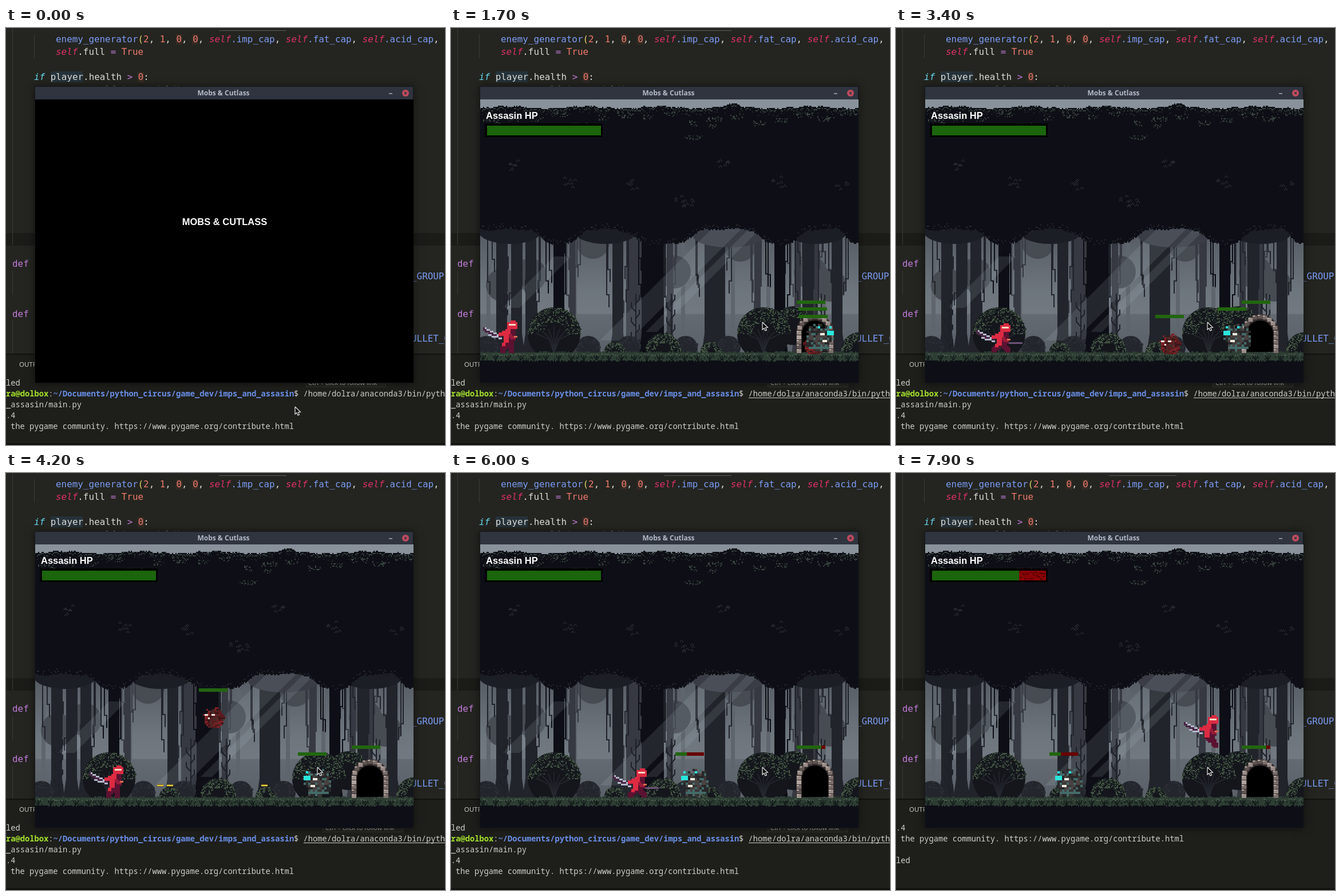
Write an HTML page with a canvas that moves like this. It is 767 by 730 pixels and loops after 8000 ms.

```html
<!DOCTYPE html>
<html lang="en">
<head>
<meta charset="utf-8">
<title>Mobs &amp; Cutlass</title>
<style>
html, body { margin: 0; width: 100%; height: 100%; overflow: hidden; background: #242520; }
canvas { display: block; }
</style>
</head>
<body>
<canvas id="stage" width="767" height="730"></canvas>
<script>
const W = 767, H = 730, LOOP = 8000, STEP = 100, TILE = 366;
const CODE = '15.9px "DejaVu Sans Mono", monospace';
const TERM = '13.75px "Noto Sans Mono", monospace';
const GAME = 'bold 16.5px "Liberation Sans", sans-serif';
const INK = '#0e0f16';
const ctx = document.getElementById('stage').getContext('2d');

function rect(g, color, x, y, w, h) {
  g.fillStyle = color;
  g.fillRect(x, y, w, h);
}
function disc(g, color, x, y, rx, ry = rx) {
  g.fillStyle = color;
  g.beginPath();
  g.ellipse(x, y, rx, ry, 0, 0, 7);
  g.fill();
}
function path(g, points) {
  g.beginPath();
  points.forEach(([x, y]) => g.lineTo(x, y));
}
function poly(g, color, points) {
  g.fillStyle = color;
  path(g, points);
  g.fill();
}
function line(g, color, width, points) {
  g.strokeStyle = color;
  g.lineWidth = width;
  path(g, points);
  g.stroke();
}
function text(g, str, x, y, font, color, align = 'left') {
  g.font = font;
  g.fillStyle = color;
  g.textAlign = align;
  g.fillText(str, x, y);
}
function layer(draw) {
  const c = document.createElement('canvas');
  c.width = W;
  c.height = H;
  draw(c.getContext('2d'));
  return c;
}
function random(seed) {
  return () => (seed = (seed * 16807) % 2147483647) / 2147483647;
}
const pick = (list, rnd) => list[Math.floor(rnd() * list.length)];

// Piecewise linear value through [time, value] points
function track(points, t) {
  const i = points.findIndex(([time]) => time >= t);
  if (i < 0) return points[points.length - 1][1];
  if (i === 0) return points[0][1];
  const [a, va] = points[i - 1], [b, vb] = points[i];
  return va + (vb - va) * (t - a) / (b - a);
}
// Height above ground for ballistic jumps given as [time of peak, height]
function jump(list, t) {
  return Math.max(0, ...list.map(([peak, h]) => h - 2500 * ((t - peak) / 1000) ** 2));
}

function drawEditor(g) {
  const blue = '#7b9cf5', num = '#f07a6c', pink = '#e0306a', white = '#dcdcd6', violet = '#c37bdc';
  const self = ['self', pink, true], comma = [', ', white];
  function code(row, x, ...parts) {
    for (const [str, color, italic] of parts) {
      text(g, str, x, Math.round(25.4 + row * 21.83), (italic ? 'italic ' : '') + CODE, color);
      x += g.measureText(str).width;
    }
  }
  rect(g, '#242520', 0, 0, W, H);
  rect(g, '#1b1c18', 0, 359, W, 22);
  rect(g, '#5c5d58', 372, 4, 118, 1);
  for (const [x, y, h] of [[11, 0, 380], [49, 10, 42], [11, 425, 42], [11, 512, 58]])
    rect(g, '#3a3b36', x, y, 1, h);
  for (const [x, y] of [[297, 11], [325, 11], [230, 77]]) rect(g, '#342b24', x, y, 11, 18);
  rect(g, '#25323a', 78, 76, 56, 19);
  code(0, 87, ['enemy_generator', blue], ['(', '#e6d36a'], ['2', num], comma, ['1', num], comma,
    ['0', num], comma, ['0', num], comma, self, ['.imp_cap', blue], comma,
    self, ['.fat_cap', blue], comma, self, ['.acid_cap', blue], comma, self);
  code(1, 87, self, ['.full ', white], ['= ', violet], ['True', num]);
  code(3, 49, ['if', '#66d9ef', true], [' player.health ', white], ['> ', violet], ['0', num], [':', white]);
  code(4, 154, ['self.imp.model()', '#7a7b76']);
  code(18, 11, ['def', violet]);
  code(19, 708, ['_GROUP', blue]);
  code(22, 11, ['def', violet]);
  code(24, 708, ['ULLET_G', blue]);
  rect(g, '#1e1f1b', 0, 571, W, 159);
  rect(g, '#11120f', 0, 570, W, 2);
  rect(g, '#11120f', 0, 727, W, 3);
  text(g, 'OUTPUT', 23, 593, '11.5px "Open Sans", sans-serif', '#d8d8d2');
}

function drawForest(g) {
  const rnd = random(77);
  const snap = v => Math.round(v / 2) * 2;
  const speck = (color, x, y) => rect(g, color, snap(x), snap(y), 2, 2);
  const dip = (x, c, w) => Math.exp(-(((x - c) / w) ** 4));
  const rim = x => 351 + 1.5 * Math.sin(x / 9) +
    26 * Math.max(dip(x, 188, 38), dip(x, 368, 55), dip(x, 573, 38), dip(x, 718, 30));

  const sky = g.createLinearGradient(0, 350, 0, 570);
  [[0, '#555a62'], [0.5, '#6d757d'], [0.68, '#727981'], [0.69, '#646a72'], [1, '#5a6068']]
    .forEach(([at, color]) => sky.addColorStop(at, color));
  rect(g, sky, 50, 345, 662, 230);

  for (const x of [62, 213, 402, 489, 551, 648]) rect(g, '#5f656d', x, 370, 7, 200);
  for (const [x, y] of [[90, 450], [138, 432], [248, 375], [390, 427], [505, 380], [628, 428], [662, 450]])
    disc(g, '#474b52', x, y, 29);

  function trunk(color, x, w) {
    rect(g, color, x, 352, w, 218);
    poly(g, color, [[x - 5, 570], [x, 535], [x + w, 535], [x + w + 5, 570]]);
    // Hooked vines beside the trunk
    for (let i = 0; i < 4; i++) {
      const side = i % 2 ? x + w + rnd() * 12 : x - 4 - rnd() * 12;
      const end = 390 + rnd() * 90, inward = i % 2 ? -4 : 4;
      line(g, color, 2, [[snap(side), 355], [snap(side), end], [snap(side) + inward, end], [snap(side) + inward, end + 22]]);
    }
  }
  for (const x of [207, 306, 377, 530, 600, 630]) trunk('#363941', x, x === 306 ? 27 : 11);
  for (const x of [79, 105, 130, 282, 443, 460, 614, 665]) trunk('#22242b', x, 19);
  disc(g, '#3a3d45', 485, 364, 62, 20);
  for (const x of [103, 270, 638]) disc(g, '#1c1e25', x, 357, 54, 21);
  for (const [x, w] of [[179, 19], [333, 39], [565, 19]]) trunk(INK, x, w);

  // Slanted shafts of light
  for (const [x, y, w, drop] of [[455, 352, 52, 195], [520, 352, 20, 180], [180, 400, 30, 90]])
    poly(g, 'rgba(190,200,215,.12)', [[x, y], [x + w, y], [x + w - drop, y + drop], [x - drop, y + drop]]);

  // Bare saplings
  for (const x of [92, 322, 384, 646]) {
    rect(g, '#1f2128', x, 465, 2, 105);
    for (let y = 475; y < 555; y += 13) {
      const d = y % 2 ? 7 : -7;
      line(g, '#1f2128', 2, [[x, y + 8], [x + d, y], [x + d, y - 8]]);
    }
  }

  // Canopy between a bumpy roof and the drooping rim
  rect(g, '#89929b', 50, 125, 662, 20);
  for (let x = 50; x < 712; x += 2) {
    const top = snap(138 + 2 * Math.sin(x / 21) + Math.sin(x / 5) + rnd() * 2 - 4 * dip(x, 490, 14));
    rect(g, INK, x, top, 2, snap(rim(x) + rnd() * 3) - top);
    if (rnd() < 0.65) speck('#34413d', x, top + rnd() * 5);
    if (rnd() < 0.4) speck('#1f2728', x, top + 4 + rnd() * 8);
    if (rnd() < 0.4) speck('#25282e', x, rim(x) - rnd() * 8);
  }
  function leaves(x, y, rx) {
    for (let i = 0; i < rx * 1.5; i++)
      speck(pick(['#3a4540', '#252d2d'], rnd), x + (rnd() - 0.5) * 2 * rx, y + (rnd() - 0.5) * 8);
  }
  for (let x = 70; x < 700; x += 39) leaves(x, 148 + rnd() * 20, 9 + rnd() * 8);
  leaves(423, 191, 16);
  leaves(456, 171, 8);
  function sprigs(x, y, n) {
    for (let i = 0; i < n; i++) {
      const px = x + (rnd() - 0.5) * n * 3, py = y + (rnd() - 0.5) * 18;
      for (const d of [-2, 0, 2]) speck('#26282d', px + d, py + Math.abs(d));
    }
  }
  for (const [x, y] of [[110, 237], [205, 267], [317, 271]]) {
    sprigs(x, y, 7);
    sprigs(x + TILE, y, 7);
  }
  sprigs(405, 301, 11);

  function bush(x, y, r, green) {
    disc(g, green ? '#14161c' : '#23262d', x, y, r);
    if (r > 40)
      for (let k = -3; k <= 3; k++)
        line(g, '#262930', 1.5, [[x, 570], [x + k * 3, y + 10], [x + k * 10, y - 12 + Math.abs(k) * 4]]);
    for (let i = 0; i < r * (green ? 9 : 2); i++) {
      const a = Math.PI * (1 + rnd()), d = r * (1 - rnd() ** 2 * 0.55);
      speck(green ? pick(['#435542', '#222b29'], rnd) : '#2d3037', x + Math.cos(a) * d, y + Math.sin(a) * d);
    }
  }
  for (const x of [62, 240, 310, 410, 485]) bush(x, 560, 21, false);
  bush(598, 521, 34, true);
  for (const x of [180, 180 + TILE]) bush(x, 535, 46, true);
  for (const [x, r] of [[285, 17], [370, 30], [453, 17], [713, 31]]) bush(x, 570 - r / 5, r, true);

  rect(g, INK, 50, 570, 662, 51);
  for (let x = 50; x < 712; x += 2) {
    const top = snap(569 - rnd() * 3);
    rect(g, '#2d3d33', x, top, 2, snap(581 + rnd() * 3) - top);
    if (rnd() < 0.45) speck('#4a5b4b', x, 569 + rnd() * 4);
    if (rnd() < 0.35) rect(g, '#1c2724', x, snap(573 + rnd() * 5), 2, 4);
  }
  for (let x = 56; x < 712; x += 22)
    for (const d of [-5, 0, 5]) line(g, '#121a1a', 1.5, [[x, 582], [x + d, 573]]);
}

function drawPortal(g) {
  const rnd = random(9);
  disc(g, '#332c2c', 636, 534, 33);
  rect(g, '#332c2c', 603, 534, 66, 33);
  function stone(x, y) {
    rect(g, pick(['#9a8d89', '#7a6e6b', '#b0a39d', '#5f5553'], rnd), x - 4, y - 4, 8, 7);
    rect(g, '#b9ada7', x - 4, y - 4, 4, 2);
  }
  for (let a = 0; a <= Math.PI; a += Math.PI / 10) stone(636 - 28 * Math.cos(a), 534 - 28 * Math.sin(a));
  for (let y = 542; y < 568; y += 8) [608, 664].forEach(x => stone(x, y));
  disc(g, '#000', 636, 535, 23);
  rect(g, '#000', 613, 535, 46, 32);
}

const HERO_X = [[2560, 56], [3350, 145], [4300, 145], [4850, 218], [5300, 218], [6700, 355], [7900, 503]];
const HERO_JUMPS = [[5113, 170], [7725, 165]];
const IMP_X = [[2330, 608], [4320, 320], [5300, 377], [6000, 320]];
const IMP_JUMPS = [[4075, 164], [5141, 186]];
const SHOTS = [3835, 4090, 4115, 4500, 4869, 5500, 5800];
const CURSOR_X = [[0, 505], [200, 519], [300, 519], [600, 544]];
const CURSOR_Y = [[0, 663], [200, 632], [300, 632], [600, 515]];

const heroX = t => track(HERO_X, t);
const heroY = t => 512 - jump(HERO_JUMPS, t);
const fatX = t => 607 - 0.0655 * Math.max(0, t - 2720);

const editor = layer(drawEditor);
const arena = layer(g => {
  g.beginPath();
  g.rect(51, 125, 661, 496);
  g.clip();
  drawForest(g);
  drawPortal(g);
});

function meter(x, y, share) {
  x = Math.round(x);
  y = Math.round(y);
  rect(ctx, '#670203', x, y, 50, 6);
  rect(ctx, '#226510', x, y, 50 * share, 6);
}

function drawHealth(t) {
  const rnd = random(5), lost = t < 6300 ? 0 : t < 7100 ? 27 : 47;
  text(ctx, 'Assasin HP', 61, 159, GAME, '#fff');
  rect(ctx, '#000', 59, 167, 206, 24);
  rect(ctx, '#8b0204', 63, 171, 199, 17);
  for (let x = 214; x < 260; x += 2) rect(ctx, '#4a0204', x, 172 + rnd() * 13, 1 + rnd() * 4, 2);
  rect(ctx, '#1b650c', 63, 171, 199 - lost, 17);
}

// Shaggy creature: ragged oval of mixed tones, facing left unless flipped
function drawBeast(x, y, cell, seed, tones, face, flip) {
  const rnd = random(seed), size = 13;
  const block = (color, c, r, w = 1, h = 1) =>
    rect(ctx, color, Math.round(x) + (flip ? size - c - w : c) * cell, Math.round(y) + r * cell, w * cell, h * cell);
  for (let r = 1; r < size; r++)
    for (let c = 0; c < size; c++) {
      const color = pick(tones, rnd);
      if (Math.hypot(c - 6, r - 7) + rnd() * 2 < 7) block(color, c, r);
    }
  face(block);
}
function fatFace(block) {
  for (const c of [1, 6]) block('#2be6dd', c, 2);
  block('#2be6dd', 0, 4, 3, 2);
  for (const [c, r] of [[4, 5], [3, 8]]) block('#eceae0', c, r, 2);
  block('#436b69', 2, 11, 9);
}
function impFace(block) {
  for (const c of [1, 5]) block('#eceae0', c, 5, 2);
  block('#eceae0', 3, 7);
}

function drawHero(t) {
  const inAir = heroY(t) < 512;
  const running = !inAir && heroX(t) !== heroX(t - STEP) && t / STEP % 4 < 3;
  const lean = running ? 5 : 0;
  const x = Math.round(heroX(t)) - lean, y = Math.round(heroY(t)) + lean, cell = 3;
  const red = '#dc2b42', dark = '#5c1231', steel = '#b5b9cb', violet = '#472542';
  // Square brush of w cells dragged between two cells
  function limb(color, x1, y1, x2, y2, w) {
    const n = Math.max(Math.abs(x2 - x1), Math.abs(y2 - y1), 1);
    for (let i = 0; i <= n; i++)
      rect(ctx, color, x + cell * Math.round(x1 + (x2 - x1) * i / n),
        y + cell * Math.round(y1 + (y2 - y1) * i / n), cell * w, cell * w);
  }
  const [back, front] = inAir ? [[17, 16], [14, 13]] : running ? [[17, 14], [9, 14]] : [[15, 16], [10, 16]];
  limb(violet, 0, 4, 9, 9, 2);
  limb(steel, 1, 4, 9, 8, 1);
  limb(steel, 3, 8, 10, 10, 1);
  limb(dark, 14, 11, ...back, 3);
  limb(dark, 12, 11, ...front, 3);
  limb(red, 12, 11, (12 + front[0]) / 2, (11 + front[1]) / 2, 2);
  limb(dark, 14, 5, 13, 9, 5);
  limb(red, 13, 5, 12, 10, 3);
  limb(red, 9, 7, 13, 5, 2);
  limb('#971b3a', 15, 8, 17, 9, 2);
  limb('#d96b50', 18, 9, 19, 9, 1);
  if (running) limb('#6d5278', 19, 11, 26, 11, 1);
  limb(red, 16, 0, 18, 0, 1);
  limb(red, 14, 1, 16, 1, 4);
  limb('#f3d9c3', 15, 2, 18, 2, 1);
}

function drawShots(t) {
  for (const start of SHOTS) {
    const y = Math.round(heroY(start) + 35);
    const x = Math.round(heroX(start) + 64 + (t - start) * 0.65);
    if (t < start || x > (y > 512 ? fatX(t) : 604)) continue;
    rect(ctx, '#6d5a22', x, y - 2, 11, 4);
    rect(ctx, '#ecd23c', x, y - 1, 11, 2);
  }
}

function drawGame(t) {
  ctx.drawImage(arena, 0, 0);
  drawHealth(t);
  meter(604, 477, t < 5500 ? 1 : 0.86);
  if (t < 6000) {
    const x = track(IMP_X, t), y = 502 - jump(IMP_JUMPS, t);
    drawBeast(x + 7, y + 30, 3, 21, ['#7d2226', '#3d1518', '#5a1a1d', '#4a2a28'], impFace, t < 2330);
    meter(x, y, t < 4400 ? 1 : 0.4);
  }
  drawBeast(fatX(t) + 10, 514, 4, 33, ['#436b69', '#484242', '#282729', '#3a3534'], fatFace, t < 2720);
  meter(fatX(t), 489, t < 4700 ? 1 : t < 5700 ? 0.8 : 0.4);
  drawShots(t);
  drawHero(t);
}

function drawTerminal(t) {
  const plain = '#cfcfc9', bold = 'bold ' + TERM;
  const row = (str, x, n, font = TERM, color = plain) => text(ctx, str, x, 626 + n * 19, font, color);
  const scrolled = t >= 6400, top = scrolled ? 0 : 3;
  row('led', 0, scrolled ? 3 : 0);
  row('.4', 0, top);
  row('the pygame community. https://www.pygame.org/contribute.html', 8, top + 1);
  if (scrolled) return;
  row('ra@dolbox', 0, 1, bold, '#a5e22e');
  row(':', 74.25, 1);
  row('~/Documents/python_circus/game_dev/imps_and_assasin', 82.5, 1, bold, '#6a8fe8');
  row('$ /home/dolra/anaconda3/bin/python', 503, 1);
  row('_assasin/main.py', 0, 2);
  if (t >= 500) rect(ctx, plain, 520, 647, 247, 1);
  const tipX = t < 100 ? 523 : t >= 900 ? 553 : 0;
  if (tipX) {
    rect(ctx, '#31322d', tipX, 612, 141, 17);
    rect(ctx, '#242520', tipX + 1, 612, 139, 16);
    text(ctx, 'Ctrl + click to follow link', tipX + 5, 625, '11px "Open Sans", sans-serif', '#b5b5af');
  }
}

function drawWindow(t) {
  ctx.shadowColor = 'rgba(0,0,0,.5)';
  ctx.shadowBlur = 14;
  rect(ctx, '#15161a', 50, 102, 662, 520);
  ctx.shadowBlur = 0;
  ctx.shadowColor = 'transparent';
  rect(ctx, '#2f343f', 51, 103, 660, 22);
  text(ctx, 'Mobs & Cutlass', 380, 118, 'bold 12px "Noto Sans", sans-serif', '#b4bac7', 'center');
  rect(ctx, '#a4aab7', 669, 114, 6, 1.5);
  disc(ctx, '#c04b5d', 698, 114, 6);
  for (const d of [-2, 2]) line(ctx, '#2f343f', 1.3, [[698 - d, 112], [698 + d, 116]]);
  if (t >= 1700) return drawGame(t);
  rect(ctx, '#000', 51, 125, 661, 496);
  text(ctx, 'MOBS & CUTLASS', 382, 345, GAME, '#fff', 'center');
}

function drawCursor(x, y) {
  const arrow = [[0, 0], [0, 13], [3, 10.5], [5, 15], [7.5, 14], [5.5, 9.5], [9.5, 9.3], [0, 0]]
    .map(([a, b]) => [x + a, y + b]);
  poly(ctx, '#111', arrow);
  line(ctx, '#e8e8e8', 1.2, arrow);
}

function frame(now) {
  const t = Math.floor(now % LOOP / STEP) * STEP;
  ctx.drawImage(editor, 0, 0);
  drawTerminal(t);
  drawWindow(t);
  drawCursor(track(CURSOR_X, t), track(CURSOR_Y, t));
  requestAnimationFrame(frame);
}
requestAnimationFrame(frame);
</script>
</body>
</html>
```
